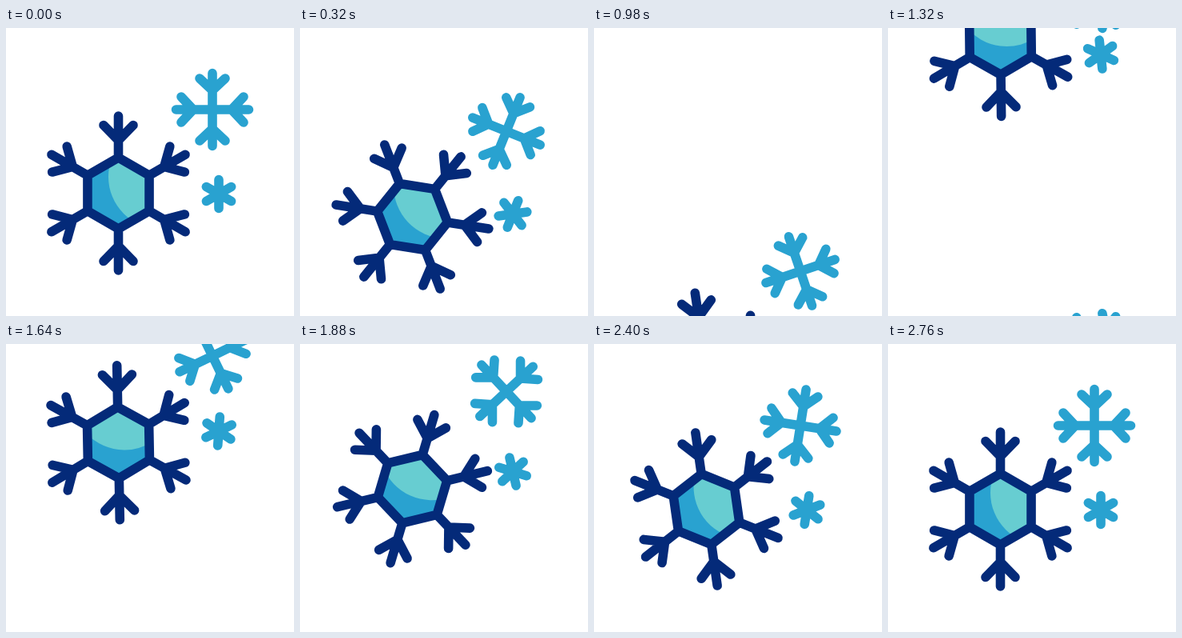
These frames come from a looping animation (360x360 px, 3220 ms). An HTML page:

```html
<!DOCTYPE html>
<html lang="en">
<head>
<meta charset="utf-8">
<title>Falling snowflakes</title>
<style>
  html, body { margin: 0; width: 100%; height: 100%; overflow: hidden; background: #fff; }
  svg { display: block; width: 100vw; height: 100vh; }
  .line { fill: none; stroke-width: 11.6; stroke-linecap: round; stroke-linejoin: round; }
  .navy { stroke: #042a79; }
  .blue { stroke: #29a2d0; }
</style>
</head>
<body>
<svg viewBox="0 0 360 360">
  <defs>
    <clipPath id="hex"><path id="hexPath"/></clipPath>
    <g id="large">
      <g clip-path="url(#hex)">
        <rect x="-50" y="-50" width="100" height="100" fill="#29a2d0"/>
        <circle cx="52.5" cy="-20.5" r="65" fill="#67cdd1"/>
      </g>
      <path class="line navy" id="largePath"/>
    </g>
    <path class="line blue" id="medium"/>
    <path class="line blue" id="small"/>
  </defs>
  <g id="stage"></g>
</svg>
<script>
const LOOP = 3220, END = 2760;
const FALL = 1800;             // time a flake takes to drop away
const SWAY = 1750;             // period of its swing while dropping
const RISE = 700;              // the new flake's swing up to its peak
const byId = id => document.getElementById(id);
const setPath = (id, d) => byId(id).setAttribute('d', d);

// Sine ease from 0 to 1, clamped at both ends.
const ease = u => (1 - Math.cos(Math.PI * Math.min(1, Math.max(0, u)))) / 2;

function turn(x, y, deg) {
  const a = deg * Math.PI / 180, c = Math.cos(a), s = Math.sin(a);
  return (x * c - y * s).toFixed(2) + ' ' + (x * s + y * c).toFixed(2);
}

function polygon(sides, radius) {
  const points = Array.from({ length: sides }, (_, i) => turn(0, -radius, i * 360 / sides));
  return 'M' + points.join('L') + 'Z';
}

// Arms around a centre; each may fork at joint into two branches.
function arms(count, from, tip, joint, bx, by) {
  let d = '';
  for (let i = 0; i < count; i++) {
    const p = (x, y) => turn(x, -y, i * 360 / count);
    d += `M${p(0, from)}L${p(0, tip)}`;
    if (joint) d += `M${p(-bx, by)}L${p(0, joint)}L${p(bx, by)}`;
  }
  return d;
}

setPath('hexPath', polygon(6, 44.5));
setPath('largePath', polygon(6, 44.5) + arms(6, 44.5, 96.5, 66, 18.5, 85));
setPath('medium', arms(4, 0, 45.5, 24, 16, 39));
setPath('small', arms(6, 0, 18));

function addCopy(id) {
  const use = document.createElementNS('http://www.w3.org/2000/svg', 'use');
  use.setAttribute('href', '#' + id);
  return byId('stage').appendChild(use);
}

// One copy falls out of view while another drops in from above.
function flake({ id, x, y, dir, drop, swing, entry, land, time, peak, tilt }) {
  const leaving = addCopy(id), arriving = addCopy(id);
  const place = (el, dy, deg) =>
    el.setAttribute('transform', `translate(${x} ${y + dy}) rotate(${dir * deg})`);

  function settle(t) {
    if (t < peak) return tilt * ease(1 - (peak - t) / RISE);
    const u = Math.min(1, (t - peak) / (END - peak));
    return tilt * (1 - ease(u ** 0.78));
  }

  return t => {
    const out = Math.min(t, FALL);
    place(leaving, drop * ease(out / FALL), swing * (1 - Math.cos(2 * Math.PI * out / SWAY)) / 2);
    place(arriving, -entry * ease((land - t) / time), settle(t));
  };
}

const flakes = [
  { id: 'large', x: 140.5, y: 206.5, dir: -1, drop: 386, swing: 71,
    entry: 410, land: 2160, time: 1745, peak: 1470, tilt: 68 },
  { id: 'medium', x: 258, y: 102, dir: 1, drop: 354, swing: 74,
    entry: 168, land: 2340, time: 1366, peak: 1530, tilt: 68 },
  { id: 'small', x: 266, y: 207.5, dir: 1, drop: 326, swing: 74,
    entry: 270, land: 2370, time: 1765, peak: 1530, tilt: 68 }
].map(flake);

const start = performance.now();
function draw() {
  const t = (performance.now() - start) % LOOP;
  flakes.forEach(move => move(t));
  requestAnimationFrame(draw);
}
draw();
</script>
</body>
</html>
```
